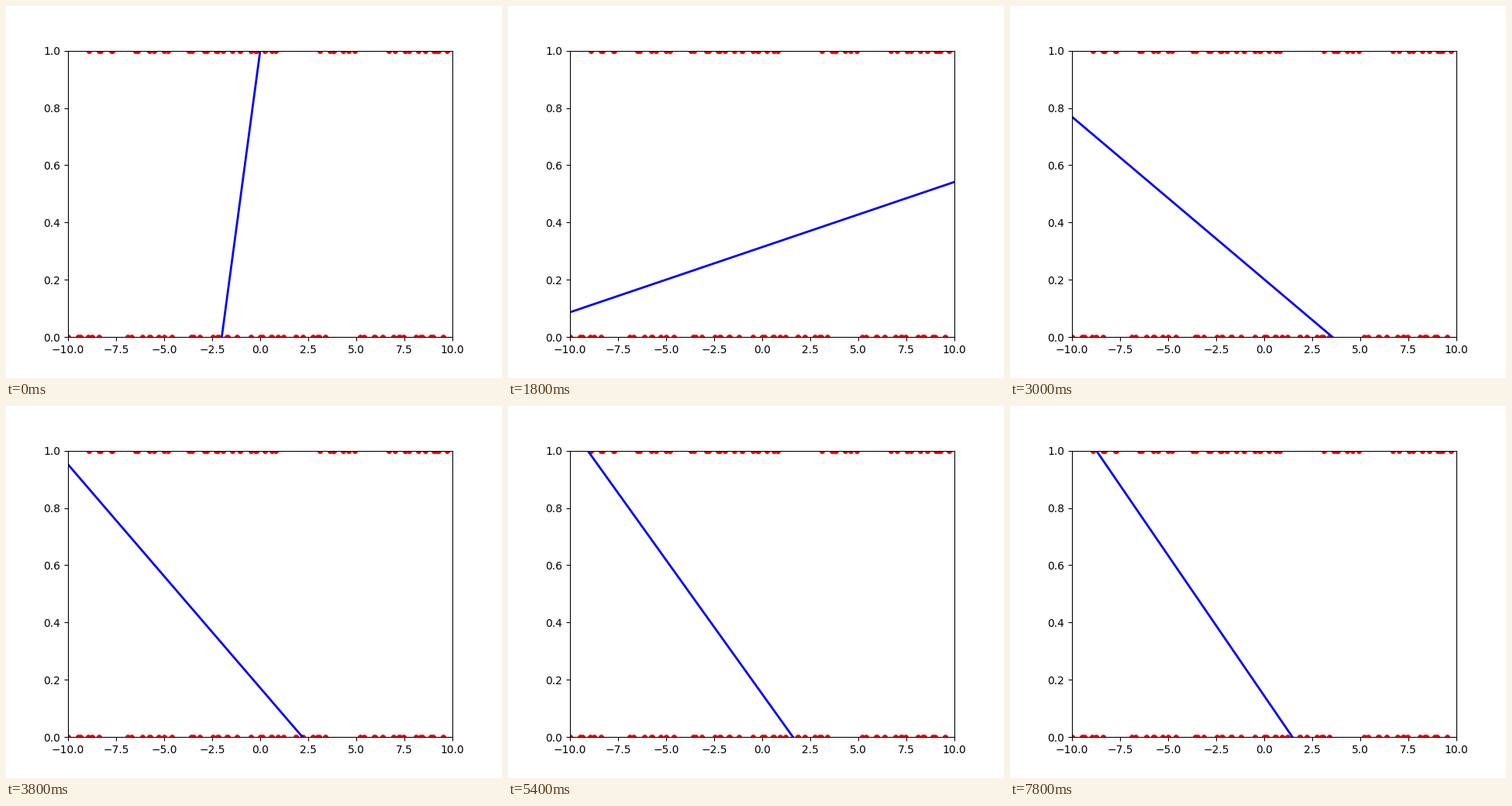
Recreate the animation shown at these times as a matplotlib script. Size 640 px wide and 480 px high, loop 8 s.

```python
import numpy as np
import matplotlib.pyplot as plt
from matplotlib.animation import FuncAnimation

FRAMES = 40
INTERVAL = 200

# Stretches of the x axis that hold samples, for each class
CLUSTERS = {
    1: [(-8.9, -7.7), (-6.5, -4.8), (-3.7, 0.8), (3.1, 4.9), (6.7, 9.7)],
    0: [(-10, -8.4), (-6.9, -4.6), (-3.6, -1.2), (-0.5, 3.4), (5.2, 9.5)],
}
SPACING = 0.31


def scatter_span(rng, lo, hi):
    """Roughly even samples with jitter, both ends of the span included."""
    xs = np.linspace(lo, hi, round((hi - lo) / SPACING) + 1)
    xs[1:-1] += rng.uniform(-0.25, 0.25, len(xs) - 2)
    return xs


def decay(start, end, rate, step):
    return end + (start - end) * rate ** step


rng = np.random.default_rng(4)
fig, ax = plt.subplots(figsize=(6.4, 4.8), dpi=100)
ax.set_xlim(-10, 10)
ax.set_ylim(0, 1)

for label, spans in CLUSTERS.items():
    xs = np.concatenate([scatter_span(rng, *span) for span in spans])
    ax.plot(xs, np.full(len(xs), label), "ro", markersize=4)

x = np.array([-10, 10])
line, = ax.plot([], [], color="blue", lw=2)


def update(step):
    slope = decay(0.5, -0.0986, 0.8375, step)
    bias = decay(1.0, 0.1433, 0.836, step)
    line.set_data(x, slope * x + bias)
    return line,


anim = FuncAnimation(fig, update, frames=FRAMES, interval=INTERVAL,
                     init_func=lambda: update(0), repeat=True, repeat_delay=0)
plt.show()
```
